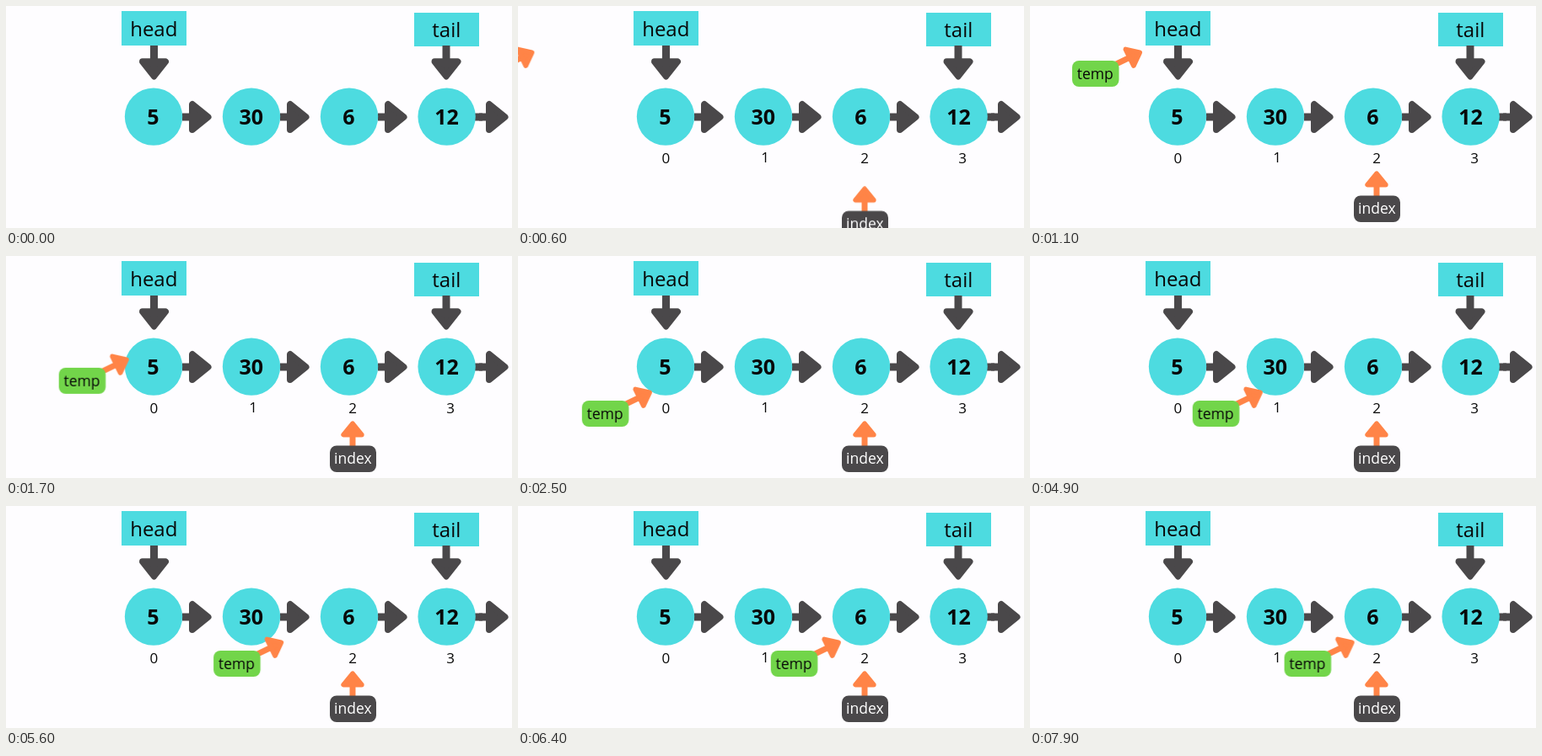
These frames come from a looping animation (600x264 px, 8000 ms). An HTML page:

```html
<!DOCTYPE html>
<html lang="en">
<head>
<meta charset="utf-8">
<title>Linked list traversal</title>
<style>
  html, body { margin: 0; width: 100%; height: 100%; overflow: hidden; background: #fefdff; }
  svg { display: block; width: 600px; height: 264px; }
  text { font-family: "Open Sans", "Noto Sans", sans-serif; text-anchor: middle; fill: #080808; }
  .box, .node circle { fill: #4ddbe0; }
  .title { font-size: 24px; }
  .node text { font-size: 25px; font-weight: 700; }
  .small { font-size: 17px; }
  .tag { font-size: 17.5px; }
  .dark { color: #4a484a; }
  .orange { color: #ff8447; }

  .numbers, .index, .temp {
    animation: 8s cubic-bezier(.37, 0, .63, 1) infinite;
  }
  .numbers { animation-name: appear; }
  .index { animation-name: rise; }
  .temp { animation-name: walk; }

  @keyframes appear {
    0%, 1.25% { opacity: 0; }
    6.25%, 100% { opacity: 1; }
  }
  @keyframes rise {
    0%, 2.5% { transform: translate(384px, 300px); }
    10%, 100% { transform: translate(384px, 226px); }
  }
  /* slide in, drop to the first node, then step along the list */
  @keyframes walk {
    0%, 5% { transform: translate(-90px, 65px); }
    13.75%, 14% { transform: translate(50px, 65px); }
    26.4%, 28.3% { transform: translate(70px, 172px); }
    48.7%, 57.4% { transform: translate(186px, 172px); }
    82%, 100% { transform: translate(301.6px, 172px); }
  }
</style>
</head>
<body>
<svg viewBox="0 0 600 264">
  <defs>
    <!-- arrow head with its tip at the origin, pointing right -->
    <path id="tip" d="M-23-15V15L-4.5 0Z" fill="currentColor" stroke="currentColor"
          stroke-width="8" stroke-linejoin="round"/>
    <g id="next">
      <path d="M-35 0H-20" stroke="currentColor" stroke-width="9"/>
      <use href="#tip"/>
    </g>
    <g id="down">
      <path d="M0-41V-20" stroke="currentColor" stroke-width="9"/>
      <use href="#tip" transform="rotate(90) scale(.95 .92)"/>
    </g>
    <g id="pointer">
      <path d="M-34 0H-14" stroke="currentColor" stroke-width="7"/>
      <use href="#tip" transform="scale(.72)"/>
    </g>
  </defs>

  <rect class="box" x="137" y="6" width="77" height="41"/>
  <text class="title" x="175.3" y="36">head</text>
  <rect class="box" x="484" y="8" width="77" height="40"/>
  <text class="title" x="522.3" y="37">tail</text>

  <g class="dark">
    <use href="#down" x="175.5" y="88"/>
    <use href="#down" x="522" y="88"/>
    <use href="#next" x="244" y="132"/>
    <use href="#next" x="360" y="132"/>
    <use href="#next" x="476" y="132"/>
    <use href="#next" x="596" y="132"/>
    <path d="M555 132H565" stroke="currentColor" stroke-width="9"/>
  </g>

  <g class="node">
    <circle cx="175" cy="131.6" r="34.2"/><text x="174.5" y="141">5</text>
    <circle cx="291" cy="131.6" r="34.2"/><text x="290.8" y="141">30</text>
    <circle cx="407" cy="131.6" r="34.2"/><text x="406.5" y="141">6</text>
    <circle cx="522.6" cy="131.6" r="34.2"/><text x="522.6" y="141">12</text>
  </g>

  <g class="numbers small">
    <text x="175.4" y="187">0</text>
    <text x="293" y="186">1</text>
    <text x="411" y="187">2</text>
    <text x="527.2" y="187">3</text>
  </g>

  <g class="index">
    <g class="orange"><use href="#pointer" transform="translate(27 -30) rotate(-90)"/></g>
    <rect y="-.5" width="55" height="31.5" rx="8" fill="#4a484a"/>
    <text class="tag" x="27.3" y="21" style="fill:#fff">index</text>
  </g>

  <g class="temp">
    <g class="orange"><use href="#pointer" transform="translate(83 -11) rotate(-26)"/></g>
    <rect width="55.5" height="31" rx="8" fill="#72d54a"/>
    <text class="tag" x="27.3" y="21.5">temp</text>
  </g>
</svg>
</body>
</html>
```
